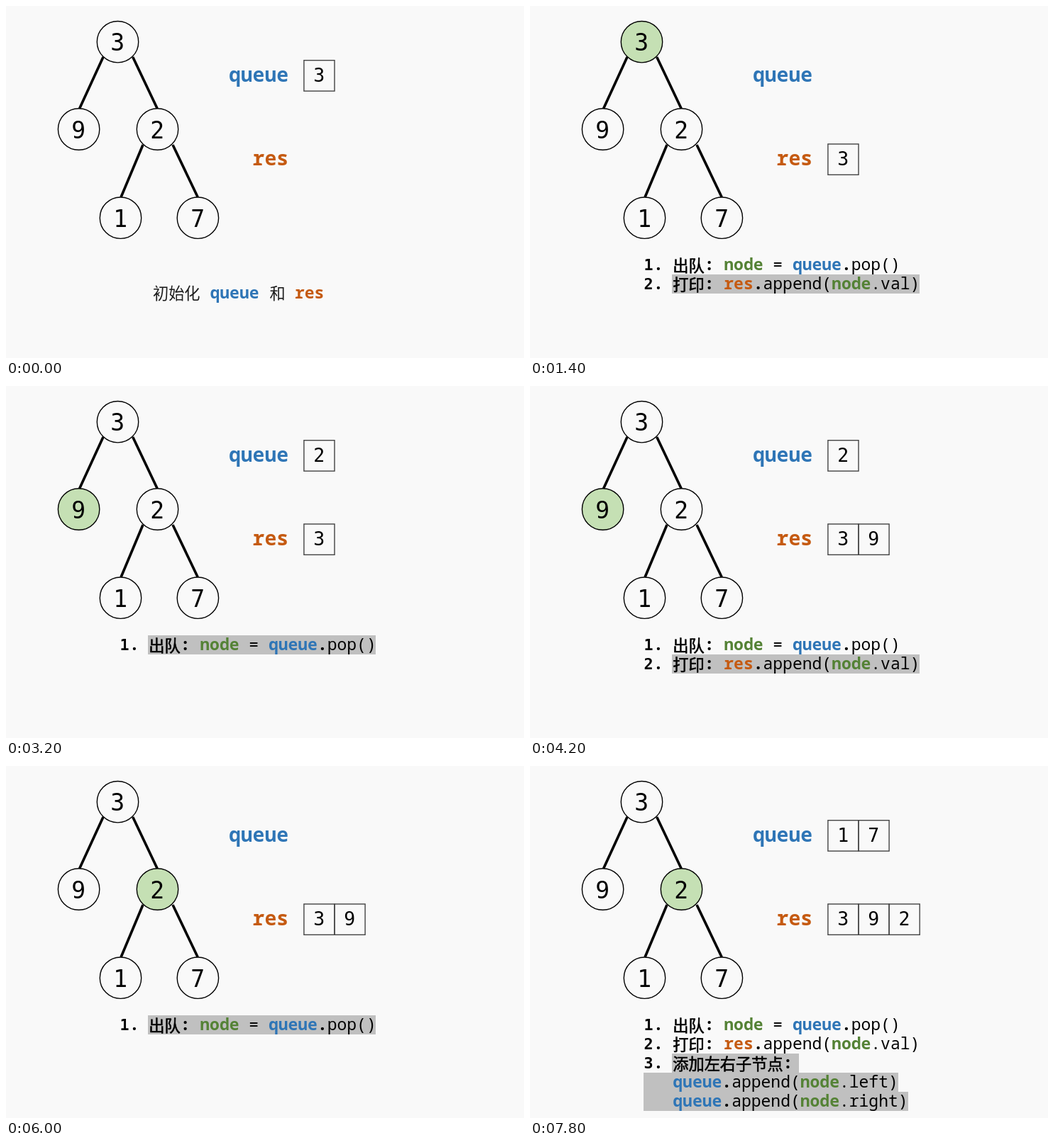
These frames come from a looping animation (730x497 px, 8000 ms). An HTML page:

```html
<!DOCTYPE html>
<html lang="zh-CN">
<head>
<meta charset="utf-8">
<title>Level-order traversal</title>
<style>
html, body { margin: 0; width: 100%; height: 100%; overflow: hidden; background: #f9f9f9; }
svg { display: block; width: 730px; height: 497px; }
text { font: 23px "Noto Sans Mono", monospace; white-space: pre; fill: #000; }
.title { font-size: 28px; text-anchor: end; }
.b, .queue, .res, .node, .step, .num { font-weight: 700; }
.queue { fill: #2e75b6; }
.res { fill: #c55a11; }
.node, .num { fill: #548235; }
.step, .num { font-family: "DejaVu Sans Mono", monospace; font-size: 21.7px; }
.zh, .zhb { font-family: "Noto Sans CJK SC", "Noto Sans CJK", sans-serif; font-size: 22.2px; }
.zh { font-weight: 300; fill: #1c1c1c; }
.zhb { font-weight: 400; stroke: #000; stroke-width: 0.6; }
.digit { font-family: "DejaVu Sans Mono", monospace; text-anchor: middle; }
.edge { stroke: #000; stroke-width: 3.6; }
.ring { stroke: #000; stroke-width: 1.4; }
.cell { fill: none; stroke: #444; stroke-width: 1.4; }
.mark { fill: #c0c0c0; }
</style>
</head>
<body>
<svg id="stage" viewBox="0 0 730 497"></svg>
<script>
const LOOP = 8000;
const nodes = [[3, 157.5, 50.7], [9, 102.6, 174], [2, 213.5, 174], [1, 161.5, 299.2], [7, 270.4, 299.2]];
const edges = [[137, 72, 103.5, 145], [178.7, 72, 213.3, 145], [193, 196, 162, 270], [235, 196, 270.3, 270]];

const TEXT_X = 201.3, LINE_H = 27;

// Tokens are [class, text, optional x].
const step = n => [["step", n, 160.5], ["b", ".", 174]];
const children = ["zhb", "添加左右子节点", TEXT_X];
const append = side => [["queue", "queue", TEXT_X], ["b", "."], ["", "append("], ["node", "node"], ["", `.${side})`]];
const pop = [...step(1), ["zhb", "出队", TEXT_X], ["b", ": "], ["node", "node"], ["", " = "],
  ["queue", "queue"], ["b", "."], ["", "pop()"]];
const print = [...step(2), ["zhb", "打印", TEXT_X], ["b", ": "], ["res", "res"], ["b", "."],
  ["", "append("], ["node", "node"], ["", ".val)"]];
const add = [...step(3), children, ["b", ":"]];
const skip = [...step(3), children, ["b", ":"], ["zh", "节点", 380], ["num", "9", 438.5], ["zh", "无左右子节点，", 466.5]];
const skipEnd = [["zh", "因此直接跳过", TEXT_X]];
const caption = [["zh", "初始化", 207], ["queue", "queue", 287.5], ["zh", "和", 371.5], ["res", "res", 407]];

// Each mark is [line, left, right].
const popping = { lines: [pop], marks: [[0, 200, 521]] };
const printing = { lines: [pop, print], marks: [[1, 200, 549]] };
const adding = {
  lines: [pop, print, add, append("left"), append("right")],
  marks: [[2, 200, 379], [3, 160, 519], [4, 160, 533]]
};
const skipping = { lines: [pop, print, skip, skipEnd], marks: [[2, 200, 622], [3, 200, 335]] };
const starting = { lines: [caption], marks: [], top: 413 };

const steps = [
  { at: 0,    active: 0, queue: [3],    res: [],        code: starting },
  { at: 500,  active: 3, queue: [],     res: [],        code: popping },
  { at: 1400, active: 3, queue: [],     res: [3],       code: printing },
  { at: 2300, active: 3, queue: [9, 2], res: [3],       code: adding },
  { at: 3200, active: 9, queue: [2],    res: [3],       code: popping },
  { at: 4200, active: 9, queue: [2],    res: [3, 9],    code: printing },
  { at: 5100, active: 9, queue: [2],    res: [3, 9],    code: skipping },
  { at: 6000, active: 2, queue: [],     res: [3, 9],    code: popping },
  { at: 6900, active: 2, queue: [],     res: [3, 9, 2], code: printing },
  { at: 7800, active: 2, queue: [1, 7], res: [3, 9, 2], code: adding }
];

const digit = (n, x, y, size) =>
  `<text class="digit" x="${x}" y="${y}" style="font-size:${size}px">${n}</text>`;

const tree = active =>
  edges.map(([x1, y1, x2, y2]) => `<line class="edge" x1="${x1}" y1="${y1}" x2="${x2}" y2="${y2}"/>`).join("") +
  nodes.map(([n, x, y]) =>
    `<circle class="ring" cx="${x}" cy="${y}" r="29.2" fill="${n === active ? "#c5e0b4" : "#f9f9f9"}"/>` +
    digit(n, x - 0.3, y + 12.6, 33)).join("");

const list = (name, values, y) =>
  `<text class="title ${name}" x="398" y="${y + 30}">${name}</text>` +
  values.map((n, i) =>
    `<rect class="cell" x="${419.9 + 43.1 * i}" y="${y}" width="43.1" height="43.4"/>` +
    digit(n, 441.2 + 43.1 * i, y + 30.3, 26.5)).join("");

const textLine = (tokens, y) => `<text y="${y}">` + tokens.map(([cls, str, x]) => {
  const pos = x === undefined ? "" : ` x="${x}"`;
  const base = cls.startsWith("zh") ? y + 1.2 : y;
  return `<tspan class="${cls}" y="${base}"${pos}>${str}</tspan>`;
}).join("") + "</text>";

const codeBlock = ({ lines, marks, top = 373.3 }) =>
  marks.map(([row, l, r]) =>
    `<rect class="mark" x="${l}" y="${352 + row * LINE_H}" width="${r - l}" height="${LINE_H}"/>`).join("") +
  lines.map((tokens, i) => textLine(tokens, top + i * LINE_H)).join("");

const stage = document.getElementById("stage");
const start = performance.now();
let shown = null;

function draw() {
  const t = (performance.now() - start) % LOOP;
  const now = steps.findLast(s => s.at <= t);
  if (now !== shown) {
    shown = now;
    stage.innerHTML = tree(now.active) + list("queue", now.queue, 76.7) +
      list("res", now.res, 194.9) + codeBlock(now.code);
  }
  requestAnimationFrame(draw);
}
draw();
</script>
</body>
</html>
```
